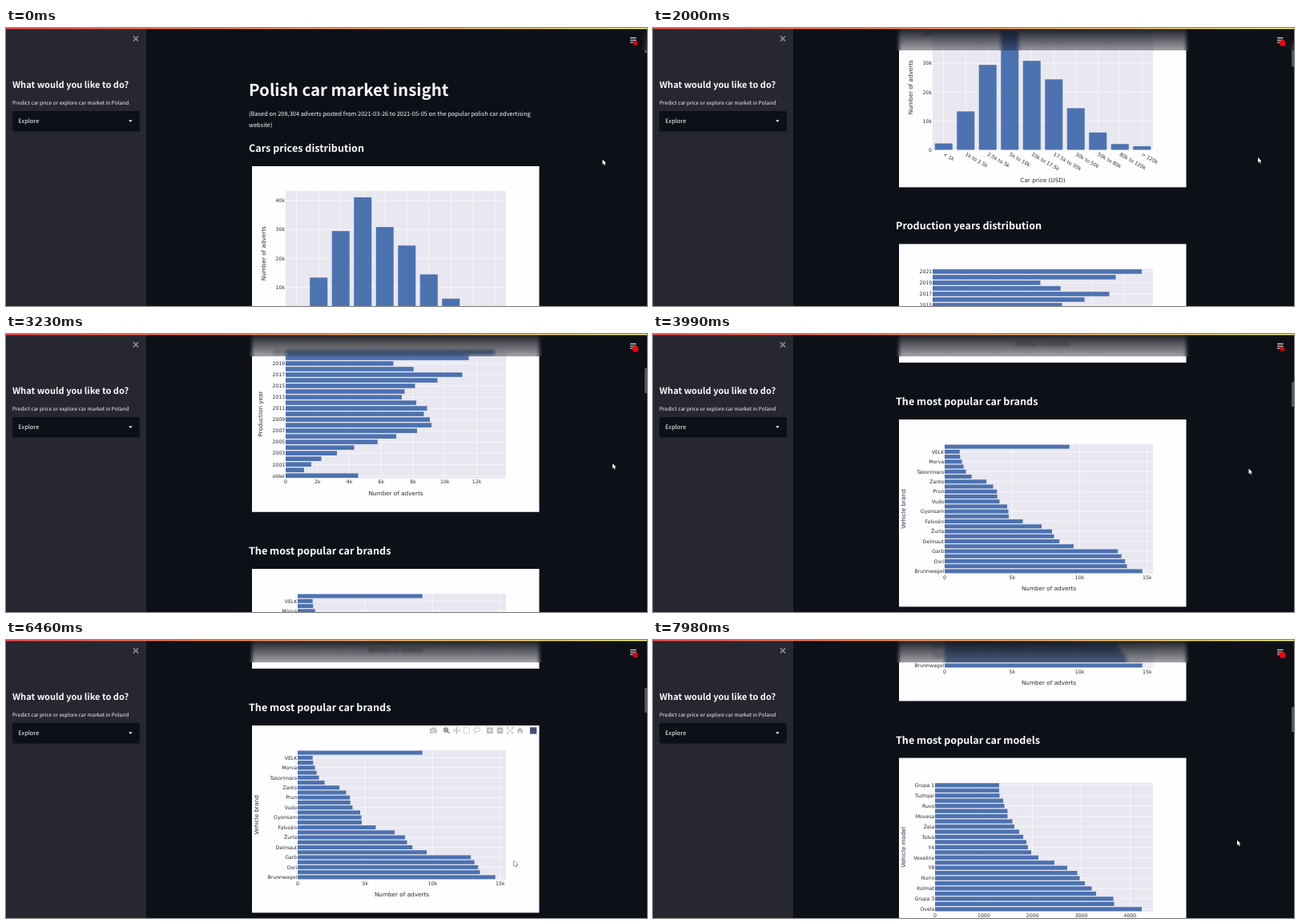
These frames come from a looping animation (800x348 px, 8000 ms). An HTML page with a canvas:

```html
<!DOCTYPE html>
<html lang="en">
<head>
<meta charset="utf-8">
<title>Car market dashboard</title>
<style>
  html, body { margin: 0; width: 100%; height: 100%; overflow: hidden; background: #0d1017; }
  canvas { display: block; }
</style>
</head>
<body>
<canvas id="stage" width="800" height="348"></canvas>
<script>
const canvas = document.getElementById('stage');
const ctx = canvas.getContext('2d');
const LOOP = 8000, TICK = 95;
const UI = '"Noto Sans CJK JP", "Noto Sans CJK SC", "Noto Sans CJK", sans-serif';
const PLOT = '"DejaVu Sans", sans-serif';
const HOVER = '"Liberation Sans", sans-serif';
const DARK = '#0d1017', BAR = '#4c72b0', INK = '#2b2b2f', PLOT_BG = '#e9e7f0';
const CARD = { x: 307, w: 358.5, h: 234.4 };
const PLOT_TOP = 31, PLOT_RIGHT = 624, HEADER_H = 28, SIDEBAR_W = 175;

const priceChart = {
  top: 173, heading: 'Cars prices distribution',
  labels: ['< 1k', '1k to 2.5k', '2.5k to 5k', '5k to 10k', '10k to 17.5k',
    '17.5k to 30k', '30k to 50k', '50k to 80k', '80k to 120k', '> 120k'],
  thousands: [2.2, 13.3, 29.4, 41.1, 30.8, 24.4, 14.4, 6, 2, 1.25],
};
const yearChart = {
  top: 478.4, heading: 'Production years distribution', left: 349, pitch: 7.015, first: 0,
  labels: [...Array.from({ length: 11 }, (_, i) => String(2021 - 2 * i)), 'older'],
  ticks: ['0', '2k', '4k', '6k', '8k', '10k', '12k'], tickGap: 39.75,
  yTitle: 'Production year', yTitleX: 317, xTitle: 'Number of adverts',
  bars: [261, 228.5, 134.5, 159.7, 220.5, 189.5, 161.5, 148.5, 145, 163, 176.5, 172.5,
    180, 182, 164, 138, 114.7, 85.5, 64, 44.5, 32, 23, 90.5],
};
const brandChart = {
  top: 784, heading: 'The most popular car brands', left: 364, pitch: 6.23, first: 1,
  labels: ['VELK', 'Morva', 'Takorimaro', 'Zanto', 'Prun', 'Vudo', 'Gyonsam', 'Falvoën',
    'Žurla', 'Delmaut', 'Garb', 'Oxri', 'Brunnwagel'],
  unlabelled: { 20: 'Tovel', 22: 'Malcena', 24: 'KRV' },
  ticks: ['0', '5k', '10k', '15k'], tickGap: 84.25,
  yTitle: 'Vehicle brand', yTitleX: 312, xTitle: 'Number of adverts',
  bars: [155.7, 18.7, 19.3, 21.7, 23.6, 26.6, 33.6, 52.2, 60.5, 65.2, 65.7, 68.5, 78,
    79.5, 80, 97.5, 121, 134, 136.5, 143.2, 161, 216.2, 220.6, 225.15, 227.5, 246.7],
};
const modelChart = {
  top: 1089.6, heading: 'The most popular car models', left: 352, pitch: 6.46, first: 0,
  labels: ['Grupa 1', 'Tuzhqar', 'Ruvo', 'Movesa', 'Zeia', 'Tolva', 'Y4', 'Vexalina',
    'Y8', 'Nurix', 'Kolmat', 'Grupa 3', 'Ovela'],
  ticks: ['0', '1000', '2000', '3000', '4000'], tickGap: 60.85,
  yTitle: 'Vehicle model', yTitleX: 312, xTitle: 'Number of adverts',
  bars: [80, 80, 80.5, 85, 86.5, 90.5, 90.5, 96.5, 99, 105, 110, 114, 116, 120, 129, 149,
    165, 177.5, 180.5, 187, 195.5, 201, 222.5, 223.5, 258],
};

// Keyframes: time, then values.
const scrollKeys = [[0, 0], [650, 0], [1600, 208], [2150, 208], [3230, 490], [3800, 677],
  [7390, 677], [7410, 684], [7980, 942]];
const cursorKeys = [[0, 744.5, 164.5], [700, 745, 164], [1600, 755, 162], [2000, 755, 162],
  [3230, 757, 162], [3990, 743.5, 168.5], [4280, 743.5, 168.5], [4900, 590, 295],
  [5420, 586, 283], [5700, 582, 277], [6000, 515, 265.5], [6300, 570, 284],
  [6600, 690, 270], [7000, 735, 257], [7410, 734, 256], [7980, 729, 250.5]];

function sample(keys, t) {
  const next = keys.findIndex(k => k[0] > t);
  if (next < 0) return keys[keys.length - 1].slice(1);
  const a = keys[next - 1], b = keys[next], p = (t - a[0]) / (b[0] - a[0]);
  return a.slice(1).map((v, i) => v + (b[i + 1] - v) * p);
}

function rect(x, y, w, h, color) {
  ctx.fillStyle = color;
  ctx.fillRect(x, y, w, h);
}

function text(str, x, y, size, { font = UI, color = '#fafafa', weight = 400, align = 'left', angle = 0 } = {}) {
  ctx.save();
  ctx.translate(x, y);
  ctx.rotate(angle);
  ctx.font = `${weight} ${size}px ${font}`;
  ctx.fillStyle = color;
  ctx.textAlign = align;
  ctx.fillText(str, 0, 0);
  ctx.restore();
}

const tickText = (str, x, y, align = 'center', angle = 0) =>
  text(str, x, y, 6.2, { font: PLOT, color: INK, align, angle });
const axisTitle = (str, x, y, angle = 0) =>
  text(str, x, y, 7.25, { font: PLOT, color: INK, align: 'center', angle });

function card(chart) {
  text(chart.heading, 303, chart.top - 18, 12.6, { weight: 700 });
  rect(CARD.x, chart.top, CARD.w, CARD.h, '#fefdff');
}

function drawPriceChart() {
  const { top, labels, thousands } = priceChart;
  const left = 349, pitch = 27.5, unit = 3.615, base = top + 187.5;
  card(priceChart);
  rect(left, top + PLOT_TOP, PLOT_RIGHT - left, base - top - PLOT_TOP, PLOT_BG);
  for (let k = 0; k <= 40; k += 10) {
    const y = base - k * unit;
    rect(left, y - 0.3, PLOT_RIGHT - left, 0.6, '#fff');
    tickText(k ? k + 'k' : '0', left - 1, y + 2.3, 'right');
  }
  labels.forEach((label, i) => {
    const x = left + (i + 0.5) * pitch, h = thousands[i] * unit;
    rect(x - 0.3, top + PLOT_TOP, 0.6, base - top - PLOT_TOP, '#fff');
    rect(x - 11, base - h, 22, h, BAR);
    tickText(label, x - 1, base + 6.8, 'left', Math.PI / 6);
  });
  axisTitle('Car price (USD)', 486.5, top + 227.5);
  axisTitle('Number of adverts', 324, top + 109.2, -Math.PI / 2);
}

function drawBarChart(chart) {
  const { top, left, pitch, bars, labels, first } = chart;
  const plotTop = top + PLOT_TOP, h = bars.length * pitch, w = PLOT_RIGHT - left;
  const rowY = i => plotTop + (i + 0.5) * pitch;
  card(chart);
  rect(left, plotTop, w, h, PLOT_BG);
  labels.forEach((label, i) => {
    const y = rowY(first + 2 * i);
    rect(left, y - 0.3, w, 0.6, '#fff');
    tickText(label, left - 0.7, y + 2.3, 'right');
  });
  chart.ticks.forEach((label, i) => {
    const x = left + i * chart.tickGap;
    rect(x - 0.3, plotTop, 0.6, h, '#fff');
    tickText(label, x, plotTop + h + 6.6);
  });
  bars.forEach((length, i) => rect(left, rowY(i) - pitch * 0.4, length, pitch * 0.8, BAR));
  axisTitle(chart.xTitle, left + w / 2, top + 213.5);
  axisTitle(chart.yTitle, chart.yTitleX + 2.5, plotTop + h / 2, -Math.PI / 2);
}

function stroke(path, color, width) {
  ctx.strokeStyle = color;
  ctx.lineWidth = width;
  ctx.stroke(new Path2D(path));
}

function drawModebar(y) {
  const gray = '#bbbbc0';
  ctx.save();
  ctx.translate(0, y);
  rect(529, -2.5, 8.5, 6, gray);
  rect(531.5, -3.7, 3.5, 1.5, gray);
  stroke('M535 .5a1.8 1.8 0 1 1 -3.6 0a1.8 1.8 0 1 1 3.6 0', '#fff', 0.9);
  stroke('M551.5 -.7a2.5 2.5 0 1 1 -5 0a2.5 2.5 0 1 1 5 0M551 1L553.5 3.6M547.6 -.7h2.8M549 -2.1v2.8', '#77777e', 1.2);
  stroke('M558.5 0h8M562.5 -4v8M560 -1.2L558.6 0L560 1.2M565 -1.2L566.4 0L565 1.2M561.3 -2.5L562.5 -3.9L563.7 -2.5M561.3 2.5L562.5 3.9L563.7 2.5', gray, 1);
  ctx.setLineDash([1.4, 1]);
  stroke('M571.5 -3.5h7v7h-7z', gray, 1);
  ctx.setLineDash([]);
  stroke('M585 2C582.5 -1 585 -3.5 588.5 -3.3C593 -3 592.5 1.5 588 1.5C585 1.5 584.5 3 586.5 3.8', gray, 1);
  rect(600, -3.8, 7.6, 7.6, gray);
  rect(612.7, -3.8, 7.6, 7.6, gray);
  stroke('M601.8 0h4M603.8 -2v4M614.5 0h4', '#fff', 1.1);
  stroke('M625.5 -3.5L632.5 3.5M632.5 -3.5L625.5 3.5M625.3 -1.5v-2.2h2.2M630.5 -3.7h2.2v2.2M625.3 1.5v2.2h2.2M630.5 3.7h2.2v-2.2', gray, 0.9);
  ctx.fillStyle = gray;
  ctx.fill(new Path2D('M637.3 .3L641.5 -3.8L645.7 .3H644.5V3.6H642.5V1H640.5V3.6H638.5V.3z'));
  rect(654, -4, 8.3, 8.3, '#3f4f75');
  ctx.restore();
}

function drawTooltip(row) {
  const { top, left, pitch, bars, labels, unlabelled } = brandChart;
  const y = top + PLOT_TOP + (row + 0.5) * pitch, end = left + bars[row];
  const name = row % 2 ? labels[(row - 1) / 2] : unlabelled[row] || 'Other';
  const lines = [`Number of adverts=${(bars[row] / 16.85).toFixed(3)}k`, `Vehicle brand=${name}`];
  ctx.font = `6.85px ${HOVER}`;
  const w = Math.max(...lines.map(s => ctx.measureText(s).width)) + 3, right = end - 3;
  const box = new Path2D(
    `M${end} ${y}L${right} ${y - 3}V${y - 9.2}H${right - w}V${y + 9.2}H${right}V${y + 3}z`);
  ctx.fillStyle = BAR;
  ctx.fill(box);
  ctx.strokeStyle = '#fff';
  ctx.lineWidth = 0.6;
  ctx.stroke(box);
  lines.forEach((line, i) => text(line, right - w + 1.5, y - 1.9 + i * 8.8, 6.85, { font: HOVER, color: '#fff' }));
}

function drawBrandHover(x, y) {
  const { top, left, pitch, bars } = brandChart;
  if (x < CARD.x || x > CARD.x + CARD.w || y < top || y > top + CARD.h) return;
  drawModebar(top + 6.3);
  const row = Math.floor((y - top - PLOT_TOP) / pitch);
  if (row >= 0 && row < bars.length && x < left + bars[row]) drawTooltip(row);
}

function drawPage(scroll, [x, y]) {
  ctx.save();
  ctx.translate(0, -scroll);
  text('Polish car market insight', 303, 85, 20.45, { weight: 700 });
  text('(Based on 208,304 adverts posted from 2021-03-26 to 2021-05-05 on the popular polish car advertising', 303, 110.2, 7.45);
  text('website)', 303, 123.7, 7.45);
  drawPriceChart();
  [yearChart, brandChart, modelChart].forEach(drawBarChart);
  drawBrandHover(x, y + scroll);
  ctx.restore();
  rect(797, Math.max(0, scroll * 0.0908 - 1.5), 3, 31, '#57585e');
}

function drawHeader() {
  ctx.save();
  ctx.beginPath();
  ctx.rect(SIDEBAR_W, 0, 800 - SIDEBAR_W, HEADER_H);
  ctx.clip();
  ctx.filter = 'blur(2px)';
  ctx.drawImage(canvas, 0, 0);
  ctx.filter = 'none';
  const shade = ctx.createLinearGradient(0, 0, 0, HEADER_H);
  shade.addColorStop(0, 'rgba(13,16,23,.95)');
  shade.addColorStop(1, 'rgba(13,16,23,.38)');
  rect(SIDEBAR_W, 0, 800 - SIDEBAR_W, HEADER_H, shade);
  ctx.restore();
}

function drawSidebar() {
  rect(0, 0, SIDEBAR_W, 348, '#262730');
  stroke('M159 10.2L165 16.4M165 10.2L159 16.4', '#8b8c96', 1.6);
  text('What would you like to do?', 8, 75.2, 11.05, { weight: 700 });
  text('Predict car price or explore car market in Poland', 8, 96.3, 6.5);
  ctx.fillStyle = DARK;
  ctx.beginPath();
  ctx.roundRect(8, 104, 159, 25.5, 2);
  ctx.fill();
  text('Explore', 15.3, 119.4, 7.45);
  ctx.fillStyle = '#fafafa';
  ctx.fill(new Path2D('M153.1 115.3h4.6l-2.3 2.4z'));
}

function drawMenu(t) {
  const glow = ctx.createLinearGradient(0, 0, 800, 0);
  glow.addColorStop(0, '#ff4b4b');
  glow.addColorStop(1, '#fffd80');
  rect(0, 0, 800, 1.3, glow);
  for (let i = 0; i < 3; i++) rect(779, 11.8 + i * 2.8, 7.6, 1.2, '#dcdcde');
  const pulse = 0.5 + 0.5 * Math.cos((t - 2000) / 1196 * 2 * Math.PI);
  ctx.fillStyle = `rgb(${205 + 40 * pulse}, 0, 14)`;
  ctx.beginPath();
  ctx.arc(785.5, 18.8, 2.7 + 1.2 * pulse, 0, 2 * Math.PI);
  ctx.fill();
}

function drawCursor([x, y]) {
  ctx.save();
  ctx.translate(x, y);
  const arrow = 'M0 0V6.4L1.5 5.1L2.5 7.6L3.6 7.1L2.6 4.7H4.6z';
  stroke(arrow, '#111', 0.8);
  ctx.fillStyle = '#fff';
  ctx.fill(new Path2D(arrow));
  ctx.restore();
}

function draw(t) {
  const cursor = sample(cursorKeys, t);
  ctx.textRendering = 'geometricPrecision';
  rect(0, 0, 800, 348, DARK);
  drawPage(sample(scrollKeys, t)[0], cursor);
  drawHeader();
  drawSidebar();
  drawMenu(t);
  drawCursor(cursor);
}

const start = performance.now();
let lastStep = -1;
function frame() {
  const step = Math.floor((performance.now() - start) % LOOP / TICK);
  if (step !== lastStep) draw(step * TICK);
  lastStep = step;
  requestAnimationFrame(frame);
}
frame();
</script>
</body>
</html>
```
